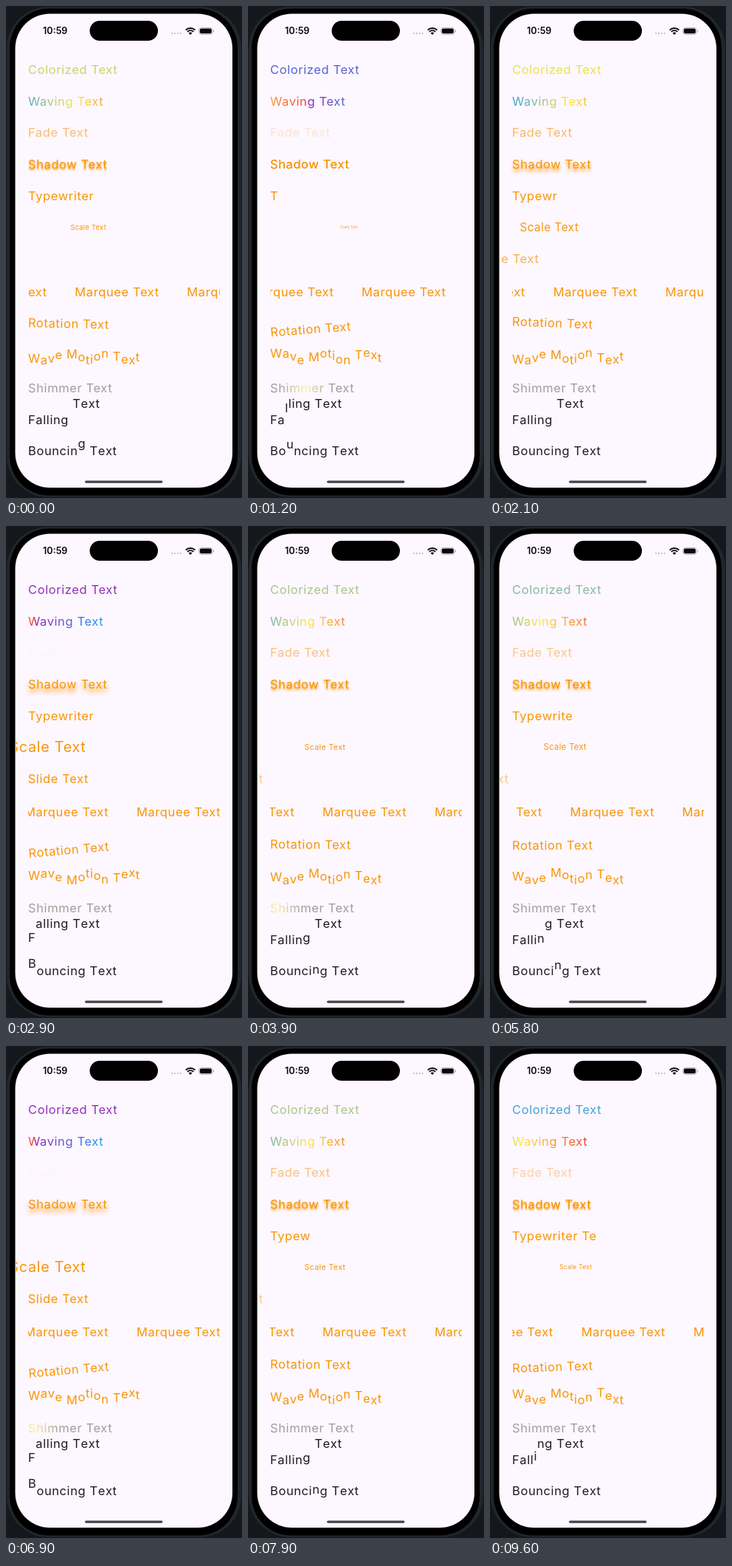
An HTML page with a canvas for the animation above (9.7 s loop, 320 px wide and 666 px high).

```html
<!DOCTYPE html>
<html lang="en">
<head>
<meta charset="utf-8">
<title>Text effects</title>
<style>
html, body { margin: 0; width: 100%; height: 100%; overflow: hidden; background: #14181c; }
canvas { display: block; width: 320px; height: 666px; }
</style>
</head>
<body>
<canvas id="stage"></canvas>
<script>
const W = 320, H = 666, LOOP = 9700, STEP = 100, ORIGIN = 833;
const LEFT = 30, BOX = 260, MID = LEFT + BOX / 2;
const SIZE = 16.5, SPACING = 0.6, DROP = 6;
const ORANGE = '#f89508', GLOW = '#ff9800', INK = '#1d1b20', PAPER = '#fdf7ff';
const SCREEN = [12.5, 10.5, 294.5, 641.5, 47];
const PALETTE = [[156, 39, 176], [33, 150, 243], [255, 235, 59], [244, 67, 54]];

const canvas = document.getElementById('stage');
const ctx = canvas.getContext('2d');
const dpr = window.devicePixelRatio || 1;
canvas.width = W * dpr;
canvas.height = H * dpr;

const mod = (a, n) => ((a % n) + n) % n;
const clamp = v => Math.min(1, Math.max(0, v));
const cycle = (t, period) => mod(t - ORIGIN, period) / period;
const pingPong = (t, half) => 1 - Math.abs(1 - 2 * cycle(t, 2 * half));

// cubic-bezier(.42, 0, .58, 1)
function easeInOut(x) {
  let lo = 0, hi = 1;
  for (let i = 0; i < 20; i++) {
    const s = (lo + hi) / 2, r = 1 - s;
    if (1.26 * r * r * s + 1.74 * r * s * s + s * s * s < x) lo = s; else hi = s;
  }
  return lo * lo * (3 - 2 * lo);
}

function bounceOut(x) {
  const k = 7.5625, d = 2.75;
  if (x < 1 / d) return k * x * x;
  if (x < 2 / d) return k * (x - 1.5 / d) ** 2 + 0.75;
  if (x < 2.5 / d) return k * (x - 2.25 / d) ** 2 + 0.9375;
  return k * (x - 2.625 / d) ** 2 + 0.984375;
}

function paletteAt(u) {
  const i = u * (PALETTE.length - 1), n = Math.min(Math.floor(i), PALETTE.length - 2);
  return `rgb(${PALETTE[n].map((c, k) => Math.round(c + (PALETTE[n + 1][k] - c) * (i - n)))})`;
}

// The palette repeats every box width, with a hard seam that travels right.
function repeatingGradient(p) {
  const x = LEFT + BOX * p, last = PALETTE.length - 1;
  const g = ctx.createLinearGradient(x - BOX, 0, x + BOX, 0);
  for (const start of [0, 0.5]) {
    PALETTE.forEach((c, i) => g.addColorStop(start + i / last / 2, `rgb(${c})`));
  }
  return g;
}

function rounded(x, y, w, h, r, fill) {
  ctx.beginPath();
  ctx.roundRect(x, y, w, h, r);
  if (fill) {
    ctx.fillStyle = fill;
    ctx.fill();
  }
}

function write(text, y, fill = ORANGE, x = LEFT) {
  ctx.fillStyle = fill;
  ctx.fillText(text, x, y + DROP);
}

function writeLetters(text, y, fill, offset) {
  let x = LEFT;
  [...text].forEach((letter, i) => {
    write(letter, y + offset(i), fill, x);
    x += ctx.measureText(letter).width;
  });
}

function scoped(draw) {
  ctx.save();
  draw();
  ctx.restore();
}

function drawStatusBar() {
  scoped(() => {
    ctx.font = '600 12.6px Inter, sans-serif';
    ctx.letterSpacing = '0px';
    ctx.fillStyle = '#08080a';
    ctx.fillText('10:59', 50, 38.4);
  });
  rounded(113.5, 20, 92.5, 27, 13.5, '#000');
  for (let i = 0; i < 4; i++) rounded(224 + i * 3.9, 36, 2, 2, 1, '#b9b3bd');

  ctx.strokeStyle = '#08080a';
  ctx.lineWidth = 1.9;
  for (const r of [9, 5.9]) {
    ctx.beginPath();
    ctx.arc(250, 39, r, -Math.PI * 0.75, -Math.PI * 0.25);
    ctx.stroke();
  }
  ctx.beginPath();
  ctx.moveTo(250, 39);
  ctx.arc(250, 39, 3.3, -Math.PI * 0.75, -Math.PI * 0.25);
  ctx.fillStyle = '#08080a';
  ctx.fill();

  ctx.strokeStyle = '#a9a5ad';
  ctx.lineWidth = 0.8;
  rounded(261.6, 29.4, 18.4, 9, 3);
  ctx.stroke();
  rounded(262.8, 30.6, 16, 6.6, 2, '#08080a');
  rounded(280.8, 32.4, 1.1, 3, 0.5, '#a9a5ad');
}

function drawPhone() {
  ctx.fillStyle = '#14181c';
  ctx.fillRect(0, 0, W, H);
  rounded(1, 1, 318, 664, 56, '#20262b');
  rounded(5, 3.5, 309, 659, 53, '#000');
  rounded(...SCREEN, PAPER);
}

function drawShadowText(v) {
  scoped(() => {
    ctx.shadowColor = GLOW;
    ctx.shadowBlur = 6.4 * v * dpr;
    ctx.shadowOffsetY = 5 * v * dpr;
    write('Shadow Text', 214);
  });
}

function drawScaleText(v) {
  scoped(() => {
    ctx.translate(MID, 299.3);
    ctx.scale(0.2 + v, 0.2 + v);
    write('Scale Text', 0, ORANGE, -BOX / 2);
  });
}

function drawSlideText(v) {
  scoped(() => {
    ctx.globalAlpha = v;
    write('Slide Text', 342, ORANGE, LEFT - 164 * (1 - v));
  });
}

function drawMarquee(p) {
  scoped(() => {
    ctx.beginPath();
    ctx.rect(LEFT, 370, BOX, 34);
    ctx.clip();
    for (let i = 0; i < 3; i++) write('Marquee Text', 387, ORANGE, LEFT + 152 * (i - p));
  });
}

function drawRotation(p) {
  scoped(() => {
    ctx.translate(MID, 431.7);
    ctx.rotate((2 * easeInOut(p) - 1) * Math.PI / 36);
    write('Rotation Text', 0, ORANGE, -BOX / 2);
  });
}

function drawShimmer(p) {
  const x = LEFT + 390 * p, reach = 33, grey = '#9e9e9e';
  const g = ctx.createLinearGradient(x - reach, 0, x + reach, 0);
  g.addColorStop(0, grey);
  g.addColorStop(0.5, '#fff3a8');
  g.addColorStop(1, grey);
  write('Shimmer Text', 517, g);
}

function drawFalling(p) {
  const text = 'Falling Text';
  writeLetters(text, 559.5, INK, i => 22 * (bounceOut(clamp(text.length * p - i)) - 1));
}

function drawBouncing(p) {
  const text = 'Bouncing Text';
  writeLetters(text, 602, INK, i => -10 * Math.sin(Math.PI * clamp(text.length * p - i)));
}

function draw(t) {
  const p = cycle(t, 2000), slow = cycle(t, 3000), v = easeInOut(pingPong(t, 2000));
  ctx.setTransform(dpr, 0, 0, dpr, 0, 0);
  drawPhone();

  ctx.save();
  rounded(...SCREEN);
  ctx.clip();
  ctx.font = `400 ${SIZE}px Inter, sans-serif`;
  ctx.letterSpacing = SPACING + 'px';

  write('Colorized Text', 86, paletteAt(p));
  write('Waving Text', 128.7, repeatingGradient(p));
  scoped(() => {
    ctx.globalAlpha = p;
    write('Fade Text', 171.3);
  });
  drawShadowText(v);
  write('Typewriter Text'.slice(0, Math.floor(15 * slow)), 256.7);
  drawScaleText(v);
  drawSlideText(v);
  drawMarquee(p);
  drawRotation(p);
  writeLetters('Wave Motion Text', 474.3, ORANGE, i => -5 * Math.sin(2 * Math.PI * p + i));
  drawShimmer(slow);
  drawFalling(p);
  drawBouncing(p);
  drawStatusBar();
  rounded(107, 642.4, 105.5, 3.4, 1.7, '#454348');
  ctx.restore();
}

const start = performance.now();
function tick() {
  const t = (performance.now() - start + 15) % LOOP;
  draw(Math.floor(t / STEP) * STEP);
  requestAnimationFrame(tick);
}
tick();
</script>
</body>
</html>
```
